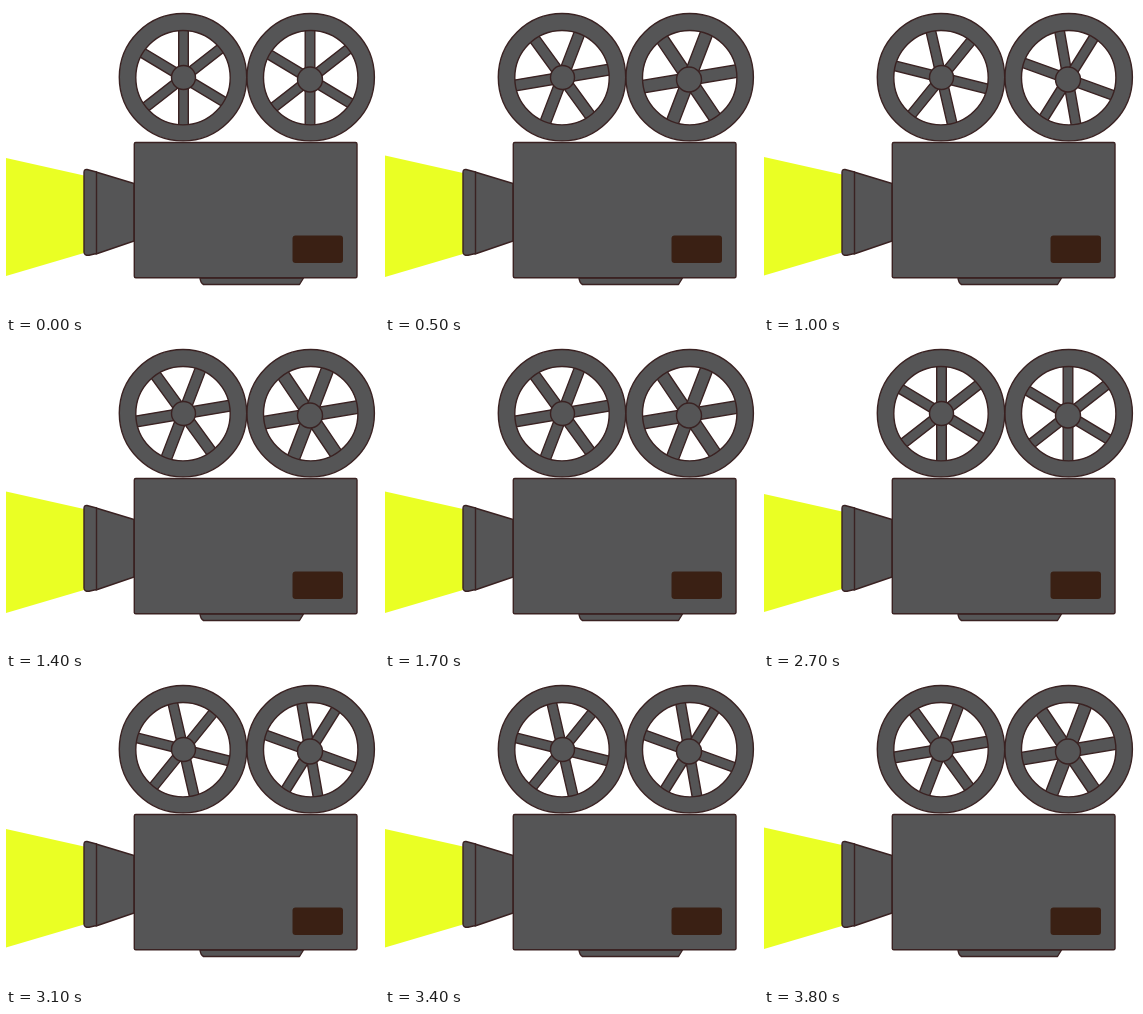
These frames come from a looping animation (373 by 308 pixels, 3.9 s). An HTML page:

```html
<!DOCTYPE html>
<html lang="en">
<head>
<meta charset="utf-8">
<title>Film projector</title>
<style>
  html, body { margin: 0; width: 100%; height: 100%; overflow: hidden; background: #fff; }
  svg { display: block; width: 373px; height: 308px; }
  .part { fill: #555556; stroke: #3a2222; stroke-width: 1.4; stroke-linejoin: round; }
  .beam { fill: #eaff24; }
  .pose { animation: show .3s step-end infinite; }
  .pose.p1 { animation-delay: -.2s; }
  .pose.p2 { animation-delay: -.1s; }
  @keyframes show {
    0% { visibility: visible; }
    33.33%, 100% { visibility: hidden; }
  }
</style>
</head>
<body>
<svg viewBox="0 0 373 308">
  <defs>
    <path id="ring" fill-rule="evenodd"
      d="M-63.7 0a63.7 63.7 0 1 0 127.4 0a63.7 63.7 0 1 0-127.4 0z
         M-47.2 .5a47.2 47.2 0 1 0 94.4 0a47.2 47.2 0 1 0-94.4 0z"/>
  </defs>

  <g id="poses"></g>

  <g class="part">
    <use href="#ring" x="177" y="71.2"/>
    <use href="#ring" x="304.7" y="71.2"/>
    <circle cx="177.5" cy="71.5" r="12"/>
    <circle cx="304" cy="73.5" r="12.5"/>
    <path d="M194 272H297.500L293.500 278.500H197.500Q194.500 277 194 272z"/>
    <path d="M90 166L128 177.500V235L90 248z"/>
    <path d="M78 166.500Q78 163.200 81 163.500L90.500 166V247.500L83 249.300Q78 249.500 78 246z"/>
    <rect x="128.300" y="136.500" width="222.700" height="135.300" rx="1.500"/>
  </g>
  <rect x="286.500" y="229.500" width="50.500" height="27.500" rx="3" fill="#3a2014"/>
</svg>
<script>
  // Each pose: beam edges at the left border, then spoke width and angles per reel.
  const poses = [
    { beam: [152, 270], reels: [[9.6, 31, 90, -38], [9.6, 31, 90, -38]] },
    { beam: [151, 269.5], reels: [[9.6, 14, 77, -51], [9.6, 20, 80, -58]] },
    { beam: [149.5, 271], reels: [[10.8, -9.5, 54, 111], [12.5, -9.5, 56, 111]] }
  ];
  const hubs = [[177.5, 71.5], [304, 73]];

  const spokes = ([width, ...angles], [x, y]) => angles.map(a =>
    `<rect x="-51" y="${-width / 2}" width="102" height="${width}"
      transform="translate(${x} ${y}) rotate(${a})"/>`).join('');

  document.getElementById('poses').innerHTML = poses.map(({ beam: [top, bottom], reels }, i) =>
    `<g class="pose p${i}">
      <path class="beam" d="M0 ${top}L78 ${top + 17.5}V${bottom - 23}L0 ${bottom}z"/>
      <g class="part">${reels.map((r, k) => spokes(r, hubs[k])).join('')}</g>
    </g>`).join('');
</script>
</body>
</html>
```
